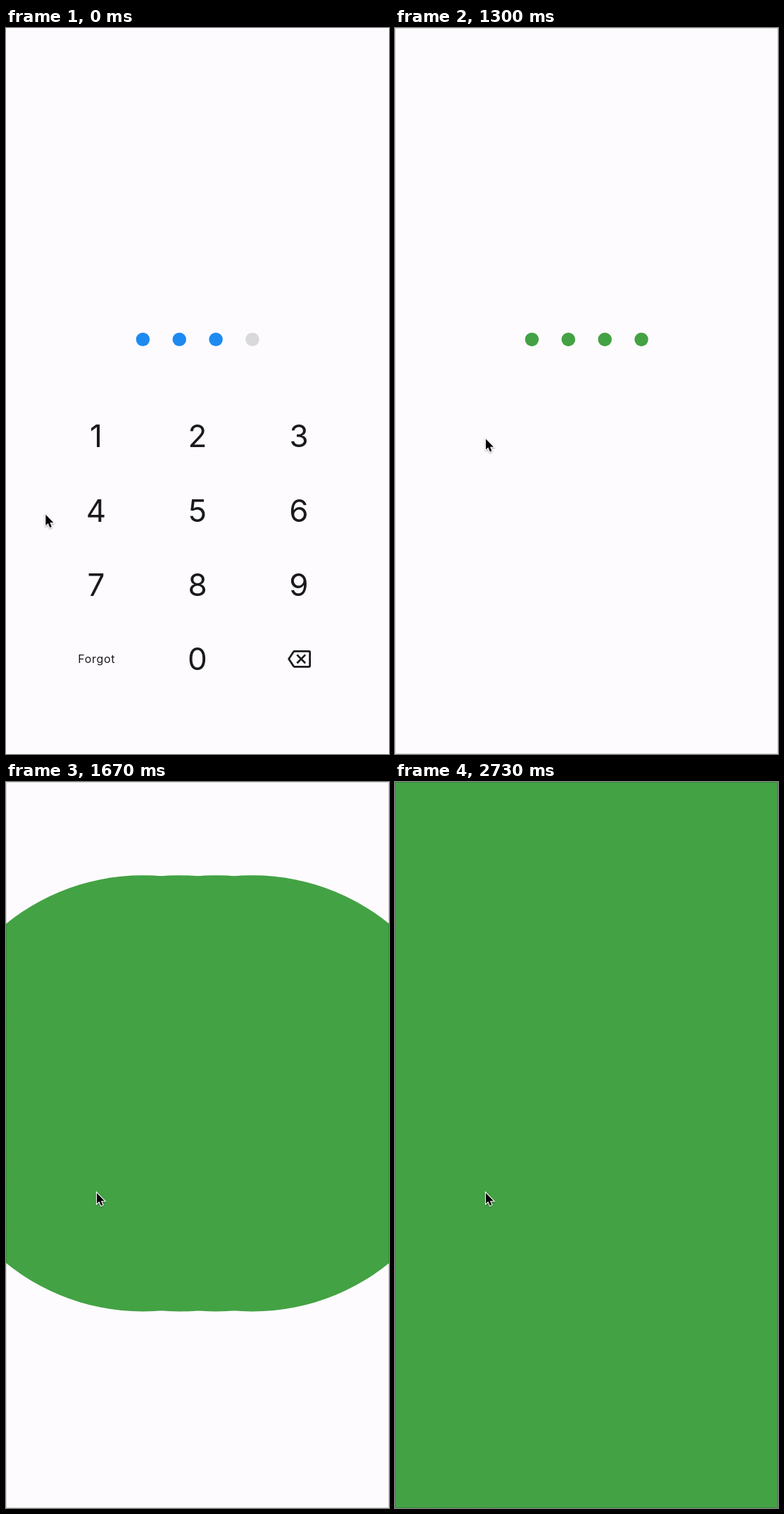
Animation, 544 px wide and 1029 px high, one loop 3700 ms. Source, as an HTML page:

```html
<!DOCTYPE html>
<html lang="en">
<head>
<meta charset="utf-8">
<title>PIN unlock</title>
<style>
  html, body { margin: 0; width: 100%; height: 100%; overflow: hidden; background: #fefbff; }
  svg { display: block; width: 544px; height: 1029px; }
  text { font-family: Inter, Roboto, sans-serif; font-size: 44px; text-anchor: middle; fill: #1a1a1d; }
  .small { font-size: 16px; letter-spacing: .7px; }
  #cursor { filter: drop-shadow(0 1px 1px rgba(0, 0, 0, .35)); }
</style>
</head>
<body>
<svg viewBox="0 0 544 1029">
  <g id="keypad">
    <text class="small" x="128.8" y="899.7">Forgot</text>
    <g transform="translate(400 877.8) scale(1.375)" fill="none" stroke="#1a1a1d" stroke-width="2">
      <path stroke-linejoin="round" d="M7 4H22Q23 4 23 5V19Q23 20 22 20H7Q6.5 20 6.2 19.5L1.2 12 6.2 4.5Q6.5 4 7 4Z"/>
      <path d="M9.7 7.7l8.6 8.6M18.3 7.7l-8.6 8.6"/>
    </g>
  </g>
  <g id="dots"></g>
  <rect id="edge" x=".5" y=".5" width="543" height="1028" fill="none" stroke="#000" stroke-opacity=".16"/>
  <circle id="ring" cx="128" cy="582" r="26.3" fill="none" stroke="#111" stroke-width="2"/>
  <path id="cursor" d="M0 0V15.2L3.4 12.1 5.9 18.2 8.4 17.1 6 11.3H10.9Z"
        fill="#000" stroke="#fff" stroke-width="2.2" paint-order="stroke"/>
</svg>
<script>
const LOOP = 3700;
const GREY = [217, 216, 219], BLUE = [29, 138, 240], GREEN = [67, 162, 68];
const $ = id => document.getElementById(id);

function add(parent, tag, attrs) {
  const node = document.createElementNS('http://www.w3.org/2000/svg', tag);
  for (const key in attrs) node.setAttribute(key, attrs[key]);
  return parent.appendChild(node);
}

[...'123456789 0'].forEach((digit, i) => {
  if (digit === ' ') return;
  const x = 128 + 144 * (i % 3), y = 594.3 + 105.2 * Math.floor(i / 3);
  add($('keypad'), 'text', { x, y }).textContent = digit;
});
const dots = [0, 1, 2, 3].map(i => add($('dots'), 'circle', { cx: 194.4 + 51.85 * i, cy: 441.4 }));

const progress = (t, from, to) => Math.min(1, Math.max(0, (t - from) / (to - from)));
const smooth = u => u * u * (3 - 2 * u);
const mix = (a, b, u) => a + (b - a) * u;
const mixColor = (a, b, u) => a.map((v, i) => mix(v, b[i], u));

// Accelerates out of the dot size, then slows until the corners are covered.
function dotRadius(t) {
  if (t < 1520) return 9.7 + 99.1 * progress(t, 1285, 1520) ** 3;
  const u = progress(t, 1520, 2030);
  const startPull = 1.36 * u * (1 - u) ** 2, endPull = .3 * u * u * (u - 1);
  return mix(108.8, 620.5, smooth(u)) + 510 * (startPull + endPull);
}

function draw(t) {
  const move = 1 - (1 - progress(t, 0, 360)) ** 2;
  const x = mix(56, 129, move), y = mix(690.4, 582.4, move);
  $('cursor').setAttribute('transform', `translate(${x} ${y})`);
  $('ring').style.display = t >= 730 && t < 820 ? '' : 'none';

  const entered = smooth(progress(t, 820, 970));
  const accepted = smooth(progress(t, 1000, 1240));
  $('keypad').style.opacity = 1 - accepted;
  $('edge').style.opacity = accepted;

  dots.forEach((dot, i) => {
    const base = i < 3 ? BLUE : mixColor(GREY, BLUE, entered);
    dot.setAttribute('fill', `rgb(${mixColor(base, GREEN, accepted)})`);
    dot.setAttribute('r', dotRadius(t));
  });
}

const start = performance.now();
function tick() {
  draw((performance.now() - start) % LOOP);
  requestAnimationFrame(tick);
}
tick();
</script>
</body>
</html>
```
